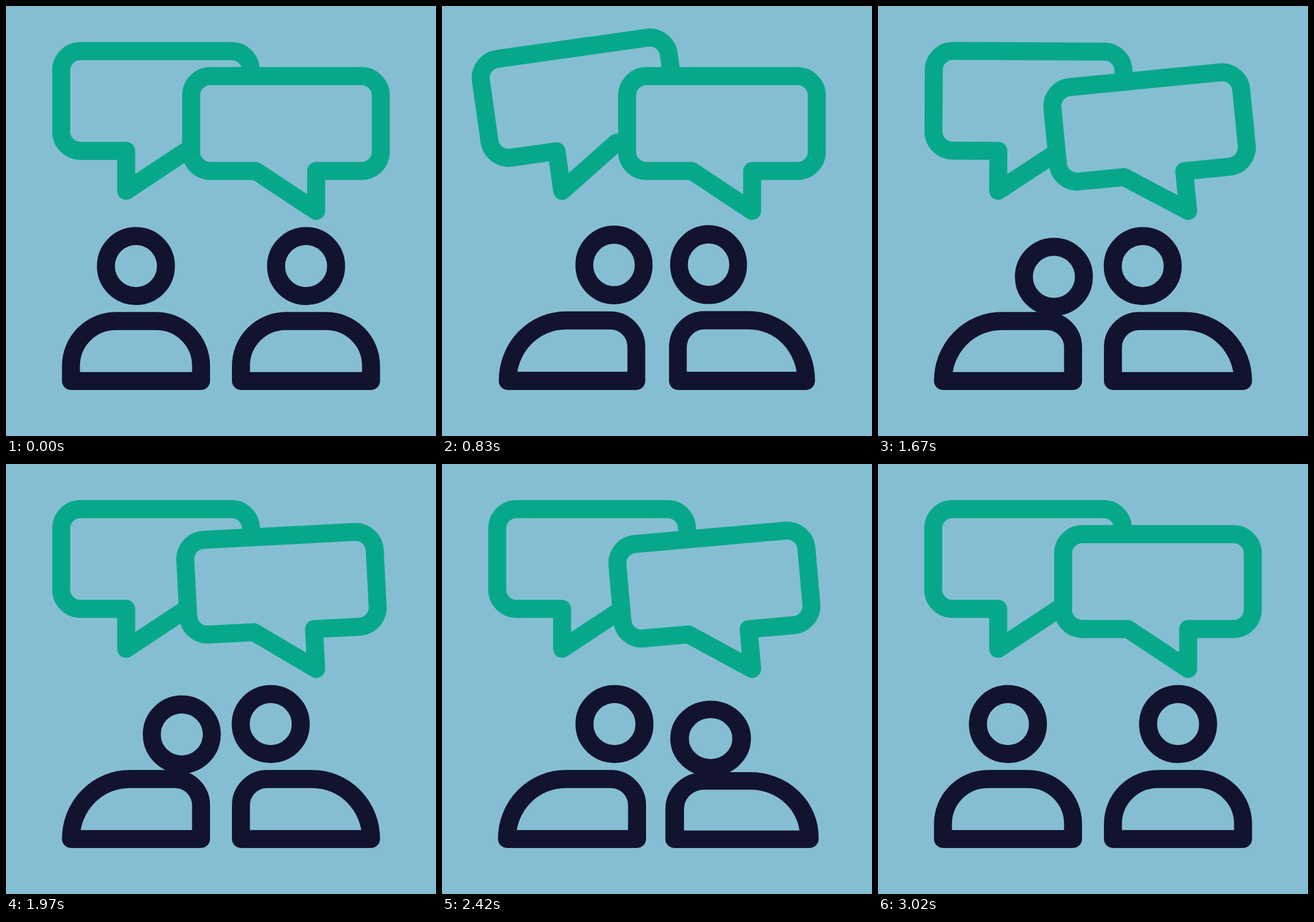
An HTML page for the animation above (3.05 s loop, 748 px wide and 748 px high).

```html
<!DOCTYPE html>
<html lang="en">
<head>
<meta charset="utf-8">
<title>Two people talking</title>
<style>
  html, body { margin: 0; width: 100%; height: 100%; overflow: hidden; background: #85bed3; }
  svg { display: block; width: 100%; height: 100%; }
  path, circle { fill: none; stroke-width: 31.3; stroke-linejoin: round; stroke-linecap: round; }
  .bubble { stroke: #07a88a; fill: #85bed3; }
  .person { stroke: #12132f; }
</style>
</head>
<body>
<svg viewBox="0 0 748 748">
  <path id="bubbleL" class="bubble" d="M129.5 78.5H392.5A33.5 33.5 0 0 1 426 112V218.5A33.5 33.5 0 0 1 392.5 252H314L209 321.5V252H129.5A33.5 33.5 0 0 1 96 218.5V112A33.5 33.5 0 0 1 129.5 78.5Z"/>
  <path id="bubbleR" class="bubble" d="M355.5 122H618.5A33.5 33.5 0 0 1 652 155.5V253.5A33.5 33.5 0 0 1 618.5 287H539.5V356.5L434.5 287H355.5A33.5 33.5 0 0 1 322 253.5V155.5A33.5 33.5 0 0 1 355.5 122Z"/>
  <g id="personL" class="person"><path/><circle r="52.2"/></g>
  <g id="personR" class="person"><path/><circle r="52.2"/></g>
</svg>
<script>
const LOOP = 3050, HOLD = 530, STEP = 30;
const $ = id => document.getElementById(id);
const ease = x => (1 - Math.cos(Math.PI * x)) / 2;
const mix = (a, b, p) => a + (b - a) * p;

// Piecewise eased track through [time, value] keys.
function track(t, keys) {
  if (t <= keys[0][0]) return keys[0][1];
  for (let i = 1; i < keys.length; i++) {
    const [t0, v0] = keys[i - 1], [t1, v1] = keys[i];
    if (t < t1) return mix(v0, v1, ease((t - t0) / (t1 - t0)));
  }
  return keys[keys.length - 1][1];
}

const swingL = [[497, 0], [732, -21], [970, 14.6], [1210, -8.9], [1450, 3.2], [1720, 0]];
const swingR = [[1575, 0], [1850, -21], [2088, 14.6], [2327, -8.9], [2567, 2.9], [2800, 0]];
const nodL = [[1400, 0], [1640, 1], [1940, 1], [2190, 0]];

const squashKeys = [[0, 0], [130, 0.053], [230, -0.016], [470, 0]];
const MOVE = 320;

const people = [
  { el: $("personL"), x: 226, side: 1, lean: 74, start: 510, end: 2545, nod: nodL },
  { el: $("personR"), x: 522, side: -1, lean: -61.5, start: 550, end: 2342 }
];

function drawPerson({ el, x, side, lean, start, end, nod }, t) {
  const p = track(t, [[start, 0], [start + MOVE, 1], [end, 1], [end + MOVE, 0]]);
  const k = track(t - start, squashKeys) + track(t - end, squashKeys);
  const n = nod ? track(t, nod) : 0;
  const dip = Math.max(0, k) * 570;

  // Back and front shoulders, measured from the body's middle.
  const bx = mix(78, 102, p), by = mix(78, 104, p), f = mix(78, 45.5, p);
  const sweep = side > 0 ? 1 : 0;
  const X = v => x + side * v;
  el.children[0].setAttribute("d",
    `M${X(-113)} 652.3V${548 + by}A${bx} ${by} 0 0 ${sweep} ${X(-113 + bx)} 548` +
    `H${X(113.3 - f)}A${f} ${f} 0 0 ${sweep} ${X(113.3)} ${548 + f}V652.3Z`);
  el.children[1].setAttribute("cx", x + lean * p + side * 6 * n);
  el.children[1].setAttribute("cy", 452.4 + 18.7 * n + dip);
  el.setAttribute("transform",
    `translate(${x} 668) scale(${1 + k} ${1 - 0.8 * k}) translate(${-x} -668)`);
}

function draw(time) {
  const t = time < HOLD ? 0 : HOLD + Math.floor((time - HOLD) / STEP) * STEP;
  $("bubbleL").setAttribute("transform", `rotate(${track(t, swingL)} 209 321.5)`);
  $("bubbleR").setAttribute("transform", `rotate(${track(t, swingR)} 539.5 356.5)`);
  people.forEach(person => drawPerson(person, t));
}

const origin = performance.now();
function tick() {
  draw((performance.now() - origin) % LOOP);
  requestAnimationFrame(tick);
}
tick();
</script>
</body>
</html>
```
